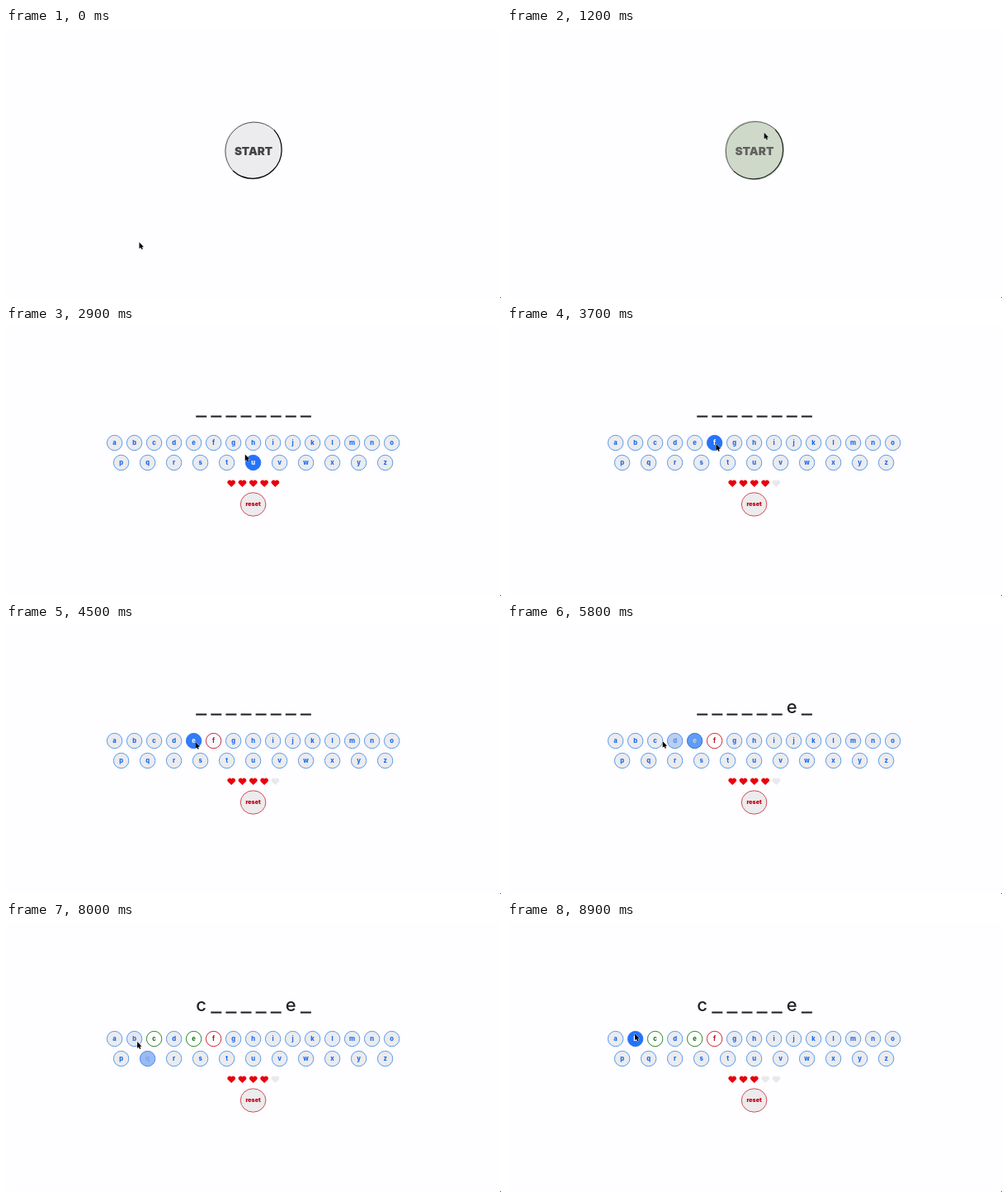
Recreate the animation shown at these times as an HTML page. Size 600x327 px, loop 9000 ms.

```html
<!DOCTYPE html>
<html lang="en">
<head>
<meta charset="utf-8">
<title>Word guessing game</title>
<style>
  html, body { margin: 0; width: 100%; height: 100%; overflow: hidden; background: #fefdff; }
  svg { display: block; width: 600px; height: 327px; }
  text { font-family: Inter, "Liberation Sans", sans-serif; text-anchor: middle; }
  .key text { font-size: 7.6px; font-weight: 800; }
  .word text { font-size: 22px; font-weight: 500; fill: #222; }
</style>
</head>
<body>
<svg id="stage" viewBox="0 0 600 327"></svg>
<script>
const LOOP = 9000, FADE = 500, START_CLICK = 2300;
const GREY = [236, 235, 237], WHITE = [255, 255, 255], BLUE = [36, 114, 250];
const TEXT_BLUE = [24, 108, 240], EDGE_BLUE = [70, 146, 236];
const GREEN = [22, 122, 16], RED = [204, 16, 30], START_GREEN = [31, 116, 0];

// Pointer tip: time, x, y
const PATH = [
  [0, 161.5, 259.5], [150, 161.5, 259.5], [600, 215, 215], [1100, 314, 120],
  [1400, 303, 150], [1700, 296.8, 160], [2700, 296.8, 160], [2900, 289.8, 155.6],
  [3400, 254, 144], [3900, 253, 143], [4150, 229.5, 143], [5450, 229.5, 143],
  [5800, 188.8, 142], [6100, 141, 156.5], [6400, 178, 142], [6800, 178, 142],
  [7100, 174, 161], [7300, 175, 167.5], [7600, 173, 164], [8150, 156, 140],
  [8600, 155, 135.5], [9000, 155, 135.5]
];

// Key: pairs of pointer enter and leave times
const HOVERS = {
  u: [[2300, 2870]], g: [[2980, 3200]], f: [[3230, 4060]], e: [[4080, 5625]],
  d: [[5640, 5770]], c: [[5810, 5890], [6290, 6960]],
  b: [[5920, 6000], [6180, 6250], [7950, 9900]], q: [[7040, 7720]]
};
const GUESSES = {
  f: { at: 3700, color: RED }, e: { at: 5000, color: GREEN, slot: 6 },
  c: { at: 6450, color: GREEN, slot: 0 }, b: { at: 8400, color: RED }
};

const stage = document.getElementById("stage");

function add(parent, tag, attrs, label) {
  const el = document.createElementNS("http://www.w3.org/2000/svg", tag);
  set(el, attrs);
  if (label) el.textContent = label;
  parent.appendChild(el);
  return el;
}
function set(el, attrs) {
  for (const name in attrs) el.setAttribute(name, attrs[name]);
}
const show = (el, on) => set(el, { visibility: on ? "visible" : "hidden" });
const smooth = v => { v = Math.min(1, Math.max(0, v)); return v * v * (3 - 2 * v); };
const mix = (a, b, k) => `rgb(${a.map((v, i) => Math.round(v + (b[i] - v) * k))})`;
const level = (t, [from, to]) => smooth((t - from) / FADE) * (1 - smooth((t - to) / FADE));

// Monotone cubic through the pointer path
function slope(i, axis) {
  if (i < 1 || i >= PATH.length - 1) return 0;
  const step = k => (PATH[k + 1][axis] - PATH[k][axis]) / (PATH[k + 1][0] - PATH[k][0]);
  const a = step(i - 1), b = step(i);
  return a * b <= 0 ? 0 : 2 * a * b / (a + b);
}
function pointerAt(t, axis) {
  let i = 0;
  while (i < PATH.length - 2 && t >= PATH[i + 1][0]) i++;
  const span = PATH[i + 1][0] - PATH[i][0], u = (t - PATH[i][0]) / span, s = smooth(u);
  return PATH[i][axis] * (1 - s) + PATH[i + 1][axis] * s
    + span * u * (1 - u) * ((1 - u) * slope(i, axis) - u * slope(i + 1, axis));
}

// Start button
const start = add(stage, "g", {});
const disc = add(start, "circle", { r: 35.5 });
const rims = [
  add(start, "path", { d: "M-24.8 24.8A35.1 35.1 0 0 1 24.8-24.8", fill: "none", stroke: "#555", "stroke-width": 1 }),
  add(start, "path", { d: "M24.8-24.8A35.1 35.1 0 0 1-24.8 24.8", fill: "none", stroke: "#000", "stroke-width": 1.2 })
];
const startText = add(start, "text", { y: 5.4, "font-size": 13.6, "font-weight": 900 }, "START");

// Game screen
const game = add(stage, "g", {});
const word = add(game, "g", { class: "word" });
const slots = Array.from({ length: 8 }, (_, i) =>
  add(word, "rect", { x: 230.2 + 18.1 * i, y: 108.5, width: 13, height: 2.1, fill: "#222" }));
const found = Object.keys(GUESSES).filter(k => "slot" in GUESSES[k]).map(letter => ({
  ...GUESSES[letter],
  el: add(word, "text", { x: 236.7 + 18.1 * GUESSES[letter].slot, y: 107.6 }, letter)
}));

const keys = [..."abcdefghijklmnopqrstuvwxyz"].map((letter, i) => {
  const x = i < 15 ? 131.6 + 24 * i : 139.6 + 32 * (i - 15), y = i < 15 ? 141.5 : 165.5;
  const g = add(game, "g", { class: "key", transform: `translate(${x} ${y})` });
  return {
    letter,
    disc: add(g, "circle", { r: 9.2, "stroke-width": 0.9 }),
    label: add(g, "text", { y: 2.5 }, letter)
  };
});

const hearts = Array.from({ length: 5 }, (_, i) => add(game, "path", {
  transform: `translate(${273.2 + 13.3 * i} 190.7)`,
  d: "M0 4.3L-4.2 .2A2.6 2.6 0 0 1 0-3A2.6 2.6 0 0 1 4.2 .2Z"
}));
add(game, "ellipse", { cx: 299.6, cy: 216, rx: 15.3, ry: 14.2, fill: "#ecebed", stroke: "#cf3a40", "stroke-width": 0.9 });
add(game, "text", { x: 299.6, y: 218.2, "font-size": 7, "font-weight": 900, fill: "#c4000e" }, "reset");

add(stage, "path", { d: "M598.6 327L600 325.6V327Z", fill: "#333" });
const pointer = add(stage, "path", {
  d: "M0 0V7.8L1.8 6.2 3 8.8 4.3 8.2 3.2 5.7H5.5Z",
  fill: "#000", stroke: "#fff", "stroke-width": 0.7, "paint-order": "stroke"
});

function drawStart(t) {
  const k = level(t, [1080, LOOP * 2]);
  set(start, { transform: `translate(300 148.2) scale(${1 + 0.11 * k})` });
  set(disc, { fill: mix(GREY, START_GREEN, k) });
  set(startText, { fill: mix([68, 68, 68], WHITE, k) });
  rims.forEach(rim => set(rim, { opacity: 1 - k }));
}

function drawKey({ letter, disc, label }, t) {
  const k = Math.max(0, ...(HOVERS[letter] || []).map(h => level(t, h)));
  const guess = GUESSES[letter], used = guess && t >= guess.at;
  set(disc, {
    fill: mix(used ? WHITE : GREY, BLUE, k),
    stroke: mix(used ? guess.color : EDGE_BLUE, BLUE, k)
  });
  set(label, { fill: mix(used ? guess.color : TEXT_BLUE, WHITE, k) });
}

function draw(t) {
  const playing = t >= START_CLICK;
  start.style.display = playing ? "none" : "";
  game.style.display = playing ? "" : "none";
  if (playing) {
    keys.forEach(key => drawKey(key, t));
    found.forEach(({ at, slot, el }) => {
      const open = t >= at;
      el.style.display = open ? "" : "none";
      show(slots[slot], !open);
    });
    const misses = Object.values(GUESSES).filter(g => g.color === RED && t >= g.at).length;
    hearts.forEach((heart, i) => set(heart, { fill: i < 5 - misses ? "#e8000b" : "#e9e8ec" }));
  } else {
    drawStart(t);
  }
  set(pointer, { transform: `translate(${pointerAt(t, 1)} ${pointerAt(t, 2)})` });
}

const began = performance.now();
function tick() {
  draw((performance.now() - began) % LOOP);
  requestAnimationFrame(tick);
}
tick();
</script>
</body>
</html>
```
